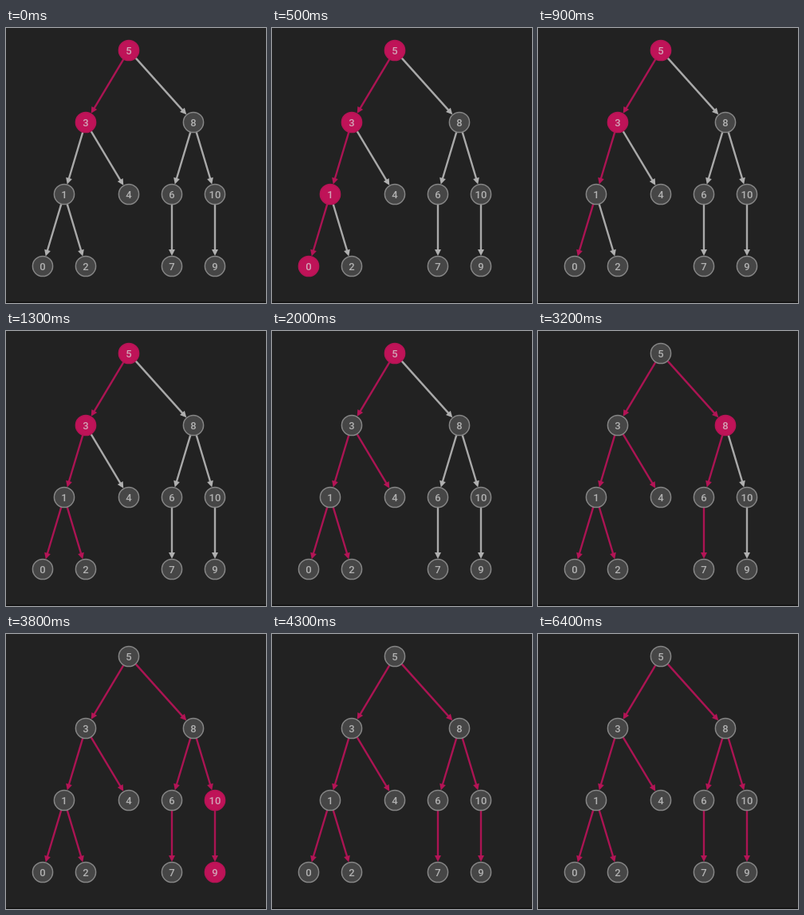
An HTML page for the animation above (8800 ms loop, 326 by 344 pixels).

```html
<!DOCTYPE html>
<html lang="en">
<head>
<meta charset="utf-8">
<title>In-order tree walk</title>
<style>
  html, body { margin: 0; width: 100%; height: 100%; overflow: hidden; background: #222; }
  svg { display: block; }
  line { stroke: #a9a9a9; stroke-width: 2.4; }
  path { fill: #b0b0b0; }
  circle { fill: #464646; stroke: #868686; stroke-width: 1.5; }
  text { font: 500 13px Roboto, Arial, sans-serif; fill: #b2b2b2; text-anchor: middle; }
  .on line { stroke: #ab1453; }
  .on path { fill: #b41456; }
  .on circle { fill: #bf1358; stroke: #b51455; }
  .on text { fill: #d2a6b7; }
</style>
</head>
<body>
<svg width="326" height="344" viewBox="0 0 326 344">
  <rect y="342.5" width="326" height="1.5" fill="#101010"/>
  <g id="edges"></g>
  <g id="nodes"></g>
</svg>
<script>
const LOOP = 8800, R = 13, LEFT = 46, TOP = 28, COL = 54, ROW = 90;
const STEP = 207.5, FRAME = 100, LEAD = -106.5;

function insert(node, value) {
  if (!node) return { value };
  const side = value < node.value ? 'left' : 'right';
  node[side] = insert(node[side], value);
  return node;
}

// Leaves sit in even columns; a parent is centred over all its leaves.
let leaves = 0;
function place(node, depth = 0) {
  const first = leaves;
  for (const kid of [node.left, node.right]) if (kid) place(kid, depth + 1);
  if (leaves === first) leaves++;
  node.x = LEFT + COL * (first + leaves - 1) / 2;
  node.y = TOP + ROW * depth;
}

// The loop opens with the first two nodes already entered.
let steps = 0;
function tick() {
  const k = steps++;
  return k < 2 ? 0 : Math.round((LEAD + k * STEP) / FRAME) * FRAME;
}

// In-order walk: a node is left after its left branch, before its right one.
function walk(node) {
  if (!node) return;
  node.enter = tick();
  walk(node.left);
  node.leave = tick();
  walk(node.right);
}

function add(parent, tag, attrs = {}) {
  const el = document.createElementNS('http://www.w3.org/2000/svg', tag);
  for (const key in attrs) el.setAttribute(key, attrs[key]);
  return parent.appendChild(el);
}

function addEdge(a, b) {
  const dx = b.x - a.x, dy = b.y - a.y, len = Math.hypot(dx, dy);
  const turn = Math.atan2(dy, dx) * 180 / Math.PI;
  const g = add(edges, 'g', { transform: `translate(${a.x} ${a.y}) rotate(${turn})` });
  add(g, 'line', { x1: R, x2: len - R - 5 });
  add(g, 'path', { d: `M${len - R} 0l-8 -4v8z` });
  return g;
}

function addNode({ x, y, value }) {
  const g = add(nodes, 'g', { transform: `translate(${x} ${y})` });
  add(g, 'circle', { r: R - 0.4 });
  add(g, 'text', { y: 4.6 }).textContent = value;
  return g;
}

const edges = document.getElementById('edges');
const nodes = document.getElementById('nodes');
const parts = [];
function build(node, parent) {
  if (!node) return;
  if (parent) parts.push({ el: addEdge(parent, node), from: node.enter, to: LOOP });
  parts.push({ el: addNode(node), from: node.enter, to: node.leave });
  build(node.left, node);
  build(node.right, node);
}

const root = [5, 3, 8, 1, 4, 6, 10, 0, 2, 7, 9].reduce(insert, null);
place(root);
walk(root);
build(root);

function draw() {
  const t = performance.now() % LOOP;
  for (const { el, from, to } of parts) el.classList.toggle('on', t >= from && t < to);
  requestAnimationFrame(draw);
}
draw();
</script>
</body>
</html>
```
